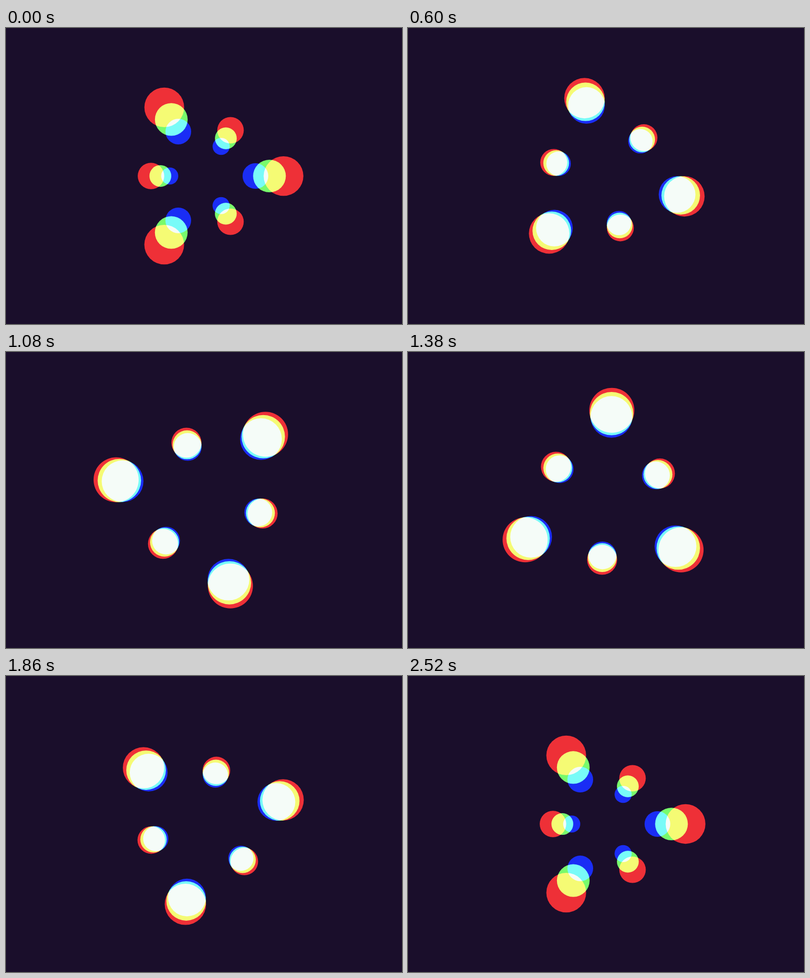
Animation, 800 px wide and 600 px high, one loop 2.55 s. Source, as an HTML page with a canvas:

```html
<!DOCTYPE html>
<html lang="en">
<head>
<meta charset="utf-8">
<title>RGB orbit</title>
<style>
  html, body { margin: 0; width: 100%; height: 100%; overflow: hidden; background: #1a0e2b; }
  canvas { display: block; }
</style>
</head>
<body>
<canvas id="stage" width="800" height="600"></canvas>
<script>
const ctx = document.getElementById('stage').getContext('2d');
const LOOP = 2550, STEP = 30, LEAD = 20;
const BG = '#1a0e2b';
const LAYERS = [
  { color: 'rgb(236,36,14)', side: 1 },
  { color: 'rgb(105,250,78)', side: 0 },
  { color: 'rgb(0,33,243)', side: -1 }
];

// Smooth curve through [x, y] points; flat at the start, given slope at the end.
function curve(points, endSlope = 0) {
  const last = points.length - 1;
  const rise = i => (points[i + 1][1] - points[i][1]) / (points[i + 1][0] - points[i][0]);
  const slopes = points.map((p, i) => {
    if (i === 0) return 0;
    if (i === last) return endSlope;
    const before = p[0] - points[i - 1][0], after = points[i + 1][0] - p[0];
    const a = rise(i - 1), b = rise(i);
    if (a * b <= 0) return 0;
    return 3 * (before + after) / ((2 * after + before) / a + (after + 2 * before) / b);
  });
  return x => {
    let i = 0;
    while (i < last - 1 && x > points[i + 1][0]) i++;
    const [x0, y0] = points[i], [x1, y1] = points[i + 1];
    const w = x1 - x0, s = (x - x0) / w, r = 1 - s;
    return r * r * ((1 + 2 * s) * y0 + s * w * slopes[i]) +
           s * s * ((1 + 2 * r) * y1 - r * w * slopes[i + 1]);
  };
}

// All three run over half a loop and are mirrored for the other half.
const turn = curve([[0, 0], [250, 2.5], [620, 14.6], [670, 17], [885, 37],
                    [1100, 73], [1150, 86.3], [1275, 120]], 0.27);
const orbit = curve([[0, 132.3], [250, 130.6], [400, 133], [560, 143.5], [620, 156],
                     [670, 160], [800, 170], [1000, 175.5], [1275, 175.5]]);
const spread = curve([[0, 28.4], [250, 24.6], [400, 17.5], [560, 9], [620, 7.6],
                      [670, 7.1], [1000, 6.7], [1275, 6.7]]);

function drawRing(dist, angle, color) {
  ctx.fillStyle = color;
  for (let i = 0; i < 6; i++) {
    const d = i % 2 ? dist * 2 / 3 : dist;
    const a = (angle + i * 60) * Math.PI / 180;
    ctx.beginPath();
    ctx.arc(400 + d * Math.cos(a), 300 + d * Math.sin(a), d / 4, 0, Math.PI * 2);
    ctx.fill();
  }
}

function draw(time) {
  const t = Math.floor((time % LOOP) / STEP) * STEP;
  const phase = (t + LEAD) % LOOP;
  const q = Math.min(phase, LOOP - phase);
  const angle = phase <= LOOP / 2 ? turn(q) : 240 - turn(q);

  ctx.globalCompositeOperation = 'source-over';
  ctx.fillStyle = BG;
  ctx.fillRect(0, 0, 800, 600);
  ctx.globalCompositeOperation = 'screen';
  for (const { color, side } of LAYERS) drawRing(orbit(q) + side * spread(q), angle, color);
}

const start = performance.now();
function tick() {
  draw(performance.now() - start);
  requestAnimationFrame(tick);
}
tick();
</script>
</body>
</html>
```
